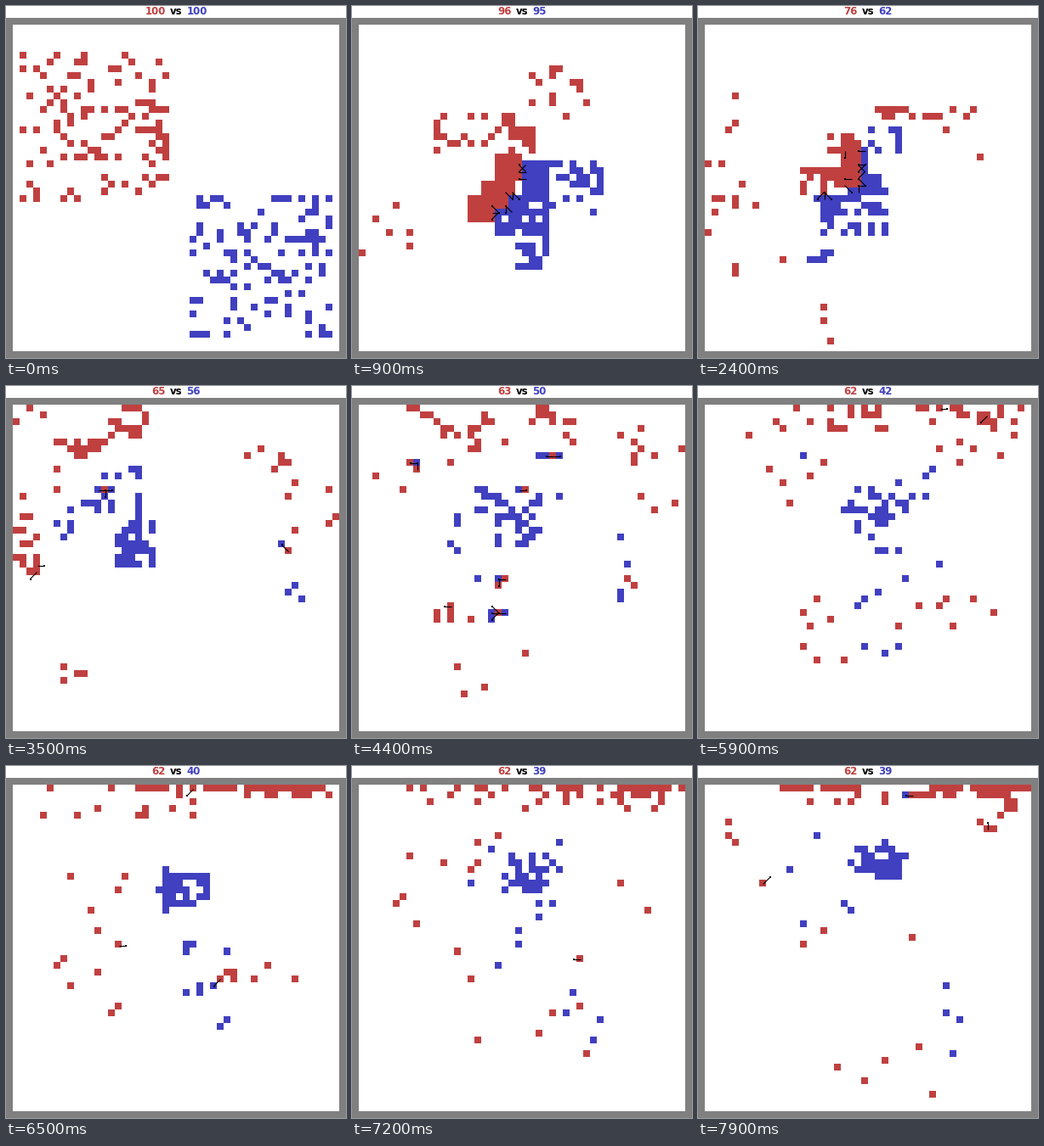
Animation of 400 by 415 pixels, one loop 8000 ms. Source, as a matplotlib script:

```python
import random

import numpy as np
import matplotlib.pyplot as plt
from matplotlib.animation import FuncAnimation
from matplotlib.collections import LineCollection

W, H, CELL, N = 400, 415, 8, 48
FRAMES = 80
RED, BLUE, GREY = "#c04040", "#4040c0", "#808080"
rnd = random.Random(12)
keys, red_forms, blue_forms = [], [], []


def formation(regions, count, used):
    """Fill regions (col, row, width, height[, random pick]) with soldiers."""
    cells = []

    def add(c):
        if c not in used and 0 <= c[0] < N and 0 <= c[1] < N:
            used.add(c)
            cells.append(c)

    for x, y, w, h, *pick in regions:
        box = [(x + i, y + j) for j in range(h) for i in range(w)]
        if pick:
            box = [c for c in box if c not in used]
            box = rnd.sample(box, min(pick[0], len(box)))
        for c in box:
            add(c)
    while len(cells) < count:
        x, y = rnd.choice(cells)
        add((x + rnd.randint(-1, 1), y + rnd.randint(-1, 1)))
    return np.array(cells[:count], float)


def phase(t, n_red, n_blue, red, blue):
    used = set()
    keys.append(t)
    red_forms.append(formation(red, n_red, used))
    blue_forms.append(formation(blue, n_blue, used))


# Deployment
phase(0, 100, 100, [(1, 4, 22, 22, 100)], [(26, 25, 21, 21, 100)])
# Clash along a slanted front
phase(9, 96, 95,
      [(20, 19, 4, 4), (18, 23, 5, 2), (16, 25, 6, 2), (16, 27, 4, 2),
       (23, 15, 3, 4, 9), (11, 13, 12, 6, 22), (25, 6, 9, 9, 13),
       (0, 11, 8, 24, 6)],
      [(24, 20, 4, 6), (20, 25, 4, 3, 9), (23, 28, 5, 8, 20),
       (28, 20, 8, 8, 22), (19, 26, 9, 5, 20)])
# Melee, red begins to scatter
phase(24, 76, 62,
      [(20, 18, 3, 6), (14, 21, 6, 4, 15), (18, 16, 5, 3, 8),
       (25, 11, 9, 3, 10), (0, 9, 12, 28, 16), (33, 7, 8, 20, 5),
       (15, 40, 5, 8, 3)],
      [(23, 18, 1, 6), (21, 24, 6, 1), (16, 25, 7, 1), (22, 22, 4, 2),
       (17, 26, 10, 5, 24), (24, 15, 8, 4, 8), (15, 34, 3, 1)])
# Red flees
phase(35, 65, 56,
      [(8, 6, 5, 1), (14, 0, 6, 5, 14), (6, 5, 8, 8, 11), (0, 13, 4, 12, 15),
       (34, 6, 7, 4, 6), (37, 10, 11, 14, 7), (0, 0, 5, 3, 3),
       (7, 38, 4, 5, 4)],
      [(18, 13, 1, 5), (15, 17, 6, 7, 27), (10, 12, 5, 4, 9),
       (13, 9, 6, 3, 5), (6, 14, 3, 6, 5), (39, 19, 4, 11, 4)])
# Red reaches the top wall, blue gathers
phase(52, 62, 45,
      [(14, 0, 12, 3, 20), (34, 0, 13, 3, 12), (41, 3, 2, 5, 6),
       (35, 8, 10, 8, 6), (34, 19, 8, 18, 6), (18, 31, 11, 13, 8),
       (8, 2, 5, 6, 4)],
      [(23, 13, 7, 6, 28), (19, 11, 13, 8, 4), (9, 2, 1, 1),
       (20, 23, 3, 5, 4), (19, 36, 8, 2, 3), (35, 1, 8, 27, 5)])
phase(65, 62, 40,
      [(18, 0, 5, 1), (28, 0, 5, 1), (34, 0, 12, 1), (34, 1, 13, 1, 7),
       (0, 0, 28, 5, 14), (27, 25, 15, 4, 7), (4, 13, 13, 23, 12)],
      [(22, 13, 5, 1), (22, 17, 5, 1), (22, 12, 1, 7), (21, 13, 8, 4, 15),
       (25, 29, 7, 7, 6), (17, 23, 24, 2, 4)])
phase(79, 62, 39,
      [(39, 0, 9, 1), (17, 0, 6, 1), (33, 0, 5, 1), (40, 1, 5, 1),
       (44, 2, 2, 2), (10, 0, 6, 1, 5), (30, 1, 10, 1, 6), (12, 1, 15, 2, 6),
       (2, 5, 10, 10, 4), (39, 4, 5, 3, 4), (12, 21, 25, 8, 3),
       (19, 38, 15, 8, 5)],
      [(23, 10, 2, 2), (25, 9, 3, 1), (27, 10, 3, 1), (22, 12, 3, 1),
       (22, 9, 7, 5, 14), (29, 1, 2, 1), (5, 4, 20, 20, 5),
       (35, 28, 3, 15, 4)])


def match(start, goal):
    """Pair starts with goals so that nobody walks far."""
    cost = ((start[:, None] - goal[None]) ** 2).sum(2)
    n = len(start)
    p, idx = np.arange(n), np.arange(n)
    for _ in range(40):
        moved = False
        for i in range(n):
            gain = cost[i, p[i]] + cost[idx, p] - cost[i, p] - cost[idx, p[i]]
            gain[i] = 0
            j = gain.argmax()
            if gain[j] > 1e-6:
                p[i], p[j] = p[j], p[i]
                moved = True
        if not moved:
            break
    return p


def march(forms, foes, seed):
    """Path of each soldier; NaN once it has fallen."""
    rng = np.random.default_rng(seed)
    paths = np.full((len(forms[0]), FRAMES, 2), np.nan)
    paths[:, 0] = forms[0]
    alive = np.arange(len(forms[0]))
    for k, (a, b) in enumerate(zip(keys, keys[1:])):
        goal, foe = forms[k + 1], foes[k + 1]
        lost = len(alive) - len(goal)
        gap = ((goal[:, None] - foe[None]) ** 2).sum(2).min(1)
        ends = np.vstack([goal, goal[np.argsort(gap)[:lost]]])
        p = match(paths[alive, a], ends)
        deaths = np.linspace(max(a + 1, 7), b, lost).round().astype(int)
        u = np.linspace(0, 1, b - a + 1)[:, None]
        for who, g in zip(alive, p):
            walk = np.zeros((b - a + 1, 2))
            walk[1:] = rng.integers(-1, 2, (b - a, 2)).cumsum(0)
            sway = 0.6 * (walk - u * walk[-1])
            path = paths[who, a] * (1 - u) + ends[g] * u + sway
            paths[who, a:b + 1] = path.round().clip(0, N - 1)
            if g >= len(goal):
                paths[who, deaths[g - len(goal)]:] = np.nan
        alive = alive[p < len(goal)]
    return paths


NEAR = sorted(((i, j) for i in range(-3, 4) for j in range(-3, 4)),
              key=lambda d: d[0] ** 2 + d[1] ** 2)
AROUND = NEAR[1:9]


def inside(x, y):
    return 0 <= x < N and 0 <= y < N


def standing(paths, t, used):
    """Cells held at step t, with at most one soldier in each."""
    cells = []
    for x, y in paths[:, t]:
        if np.isnan(x):
            continue
        x, y = int(x), int(y)
        spots = [(x + i, y + j) for i, j in NEAR if inside(x + i, y + j)]
        spot = next((s for s in spots if s not in used), (x, y))
        used.add(spot)
        cells.append(spot)
    return cells


def strikes(reds, blues, t):
    foes = set(blues)
    hits = [((x, y), (x + i, y + j)) for x, y in reds for i, j in AROUND
            if (x + i, y + j) in foes]
    rnd.shuffle(hits)
    hits = [h if rnd.random() < 0.6 else h[::-1] for h in hits[:12]]
    if t >= 20:
        for x, y in rnd.sample(reds, 2):
            i, j = rnd.choice(AROUND)
            if inside(x + i, y + j):
                hits.append(((x, y), (x + i, y + j)))
    return hits


red_paths = march(red_forms, blue_forms, 3)
blue_paths = march(blue_forms, red_forms, 4)
scenes = []
for t in range(FRAMES):
    taken = set()
    reds = standing(red_paths, t, taken)
    blues = standing(blue_paths, t, taken)
    scenes.append((reds, blues, strikes(reds, blues, t)))


def rgb(code):
    return [int(code[i:i + 2], 16) for i in (1, 3, 5)]


def centre(c):
    return CELL * c[0] + 12.5, CELL * c[1] + 27.5


fig = plt.figure(figsize=(W / 100, H / 100), dpi=100, facecolor="white")
ax = fig.add_axes([0, 0, 1, 1])
ax.axis("off")
blank = np.full((N + 2, N + 2, 3), rgb(GREY), np.uint8)
blank[1:-1, 1:-1] = 255
field = ax.imshow(blank, extent=(0, W, H, H - W), aspect="auto",
                  interpolation="nearest")
ax.set_xlim(0, W)
ax.set_ylim(H, 0)
blows = LineCollection([], colors="black", linewidths=0.8, zorder=3)
ax.add_collection(blows)
tips = ax.scatter([], [], s=2.2, c="black", marker="s", linewidths=0, zorder=4)

font = dict(family="DejaVu Sans", weight="bold", size=11.8 * 0.72,
            va="baseline")
red_text = ax.text(188, 10.5, "", color=RED, ha="right", **font)
ax.text(200, 10.5, "vs", color="black", ha="center", **font)
blue_text = ax.text(212.5, 10.5, "", color=BLUE, ha="left", **font)


def draw(t):
    reds, blues, hits = scenes[t]
    img = blank.copy()
    for cells, colour in ((reds, RED), (blues, BLUE)):
        for x, y in cells:
            img[y + 1, x + 1] = rgb(colour)
    field.set_data(img)
    segs = [(centre(a), centre(b)) for a, b in hits]
    blows.set_segments(segs)
    tips.set_offsets(np.array([s[1] for s in segs]).reshape(-1, 2))
    red_text.set_text(str(len(reds)))
    blue_text.set_text(str(len(blues)))
    return field, blows, tips, red_text, blue_text


anim = FuncAnimation(fig, draw, frames=FRAMES, interval=100, repeat=True,
                     repeat_delay=0, blit=False)
plt.show()
```
